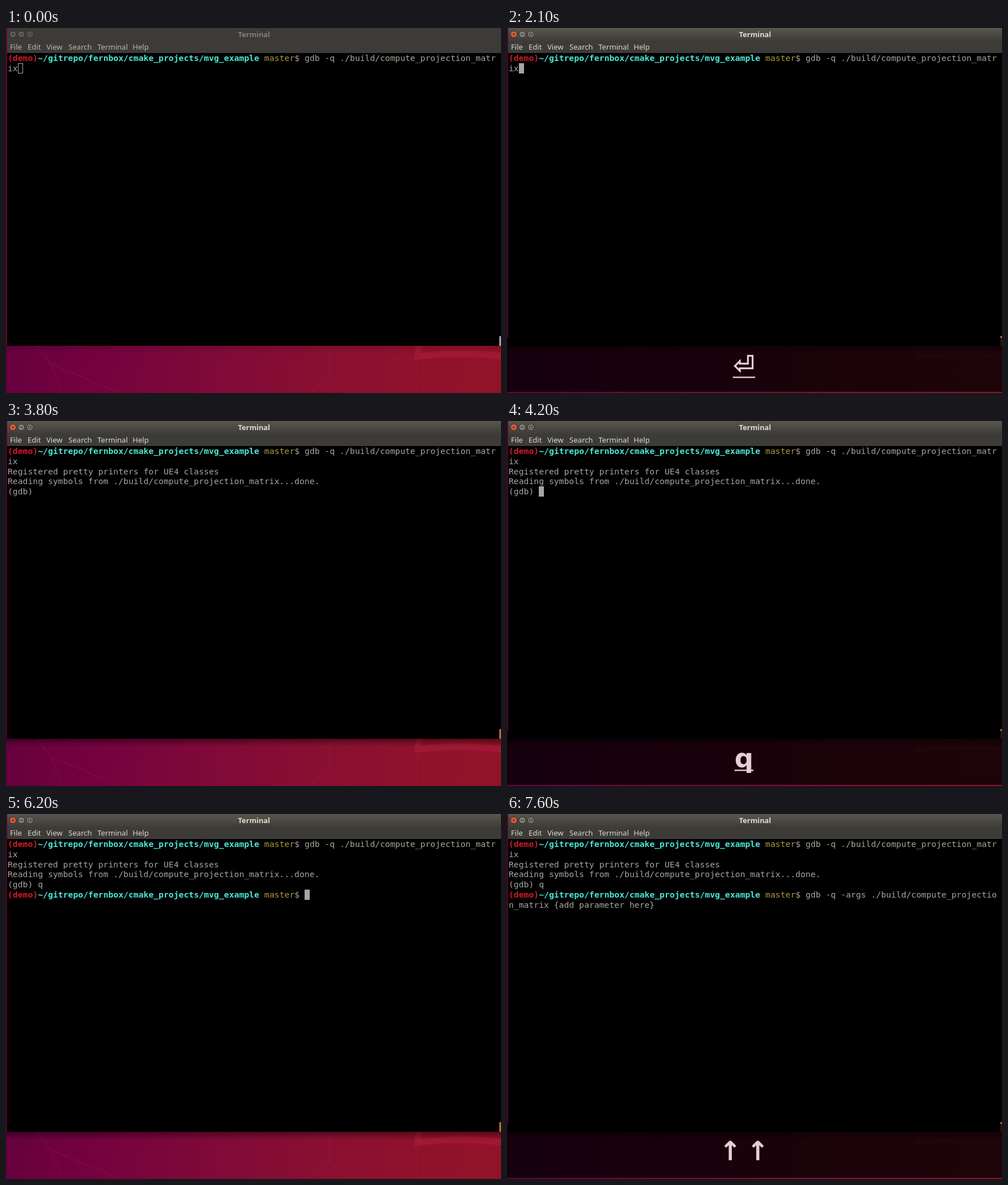
An HTML page for the animation above (8 s loop, 872 by 642 pixels).

```html
<!DOCTYPE html>
<html lang="en">
<head>
<meta charset="utf-8">
<title>Terminal</title>
<style>
  html, body { margin: 0; width: 100%; height: 100%; overflow: hidden; background: #000; }
  svg { display: block; width: 872px; height: 642px; }
  text { white-space: pre; }
  .mono { font: 14.725px "DejaVu Sans Mono", monospace; fill: #a5a5a2; }
  .who { font-weight: bold; fill: #cf1b29; }
  .path { font-weight: bold; fill: #4ae8d6; }
  .branch { fill: #b0983a; }
  .menu { font: 13.1px "Noto Sans", sans-serif; }
  .title { font: bold 12.8px "Noto Sans", sans-serif; }
  .keys { font: bold 46.7px "DejaVu Sans", sans-serif; fill: #fff; }
</style>
</head>
<body>
<svg id="stage" viewBox="0 0 872 642" xmlns="http://www.w3.org/2000/svg">
  <defs>
    <linearGradient id="wall" x2="1" y2="0.08">
      <stop offset="0" stop-color="#62003f"/>
      <stop offset=".25" stop-color="#74023f"/>
      <stop offset=".5" stop-color="#800a38"/>
      <stop offset=".75" stop-color="#8b1030"/>
      <stop offset="1" stop-color="#92122a"/>
    </linearGradient>
    <linearGradient id="bar" x2="0" y2="1">
      <stop offset="0" stop-color="#58564d"/>
      <stop offset="1" stop-color="#3c3b37"/>
    </linearGradient>
    <linearGradient id="shade" x2="0" y2="1">
      <stop offset="0" stop-color="#000" stop-opacity=".4"/>
      <stop offset="1" stop-color="#000" stop-opacity="0"/>
    </linearGradient>
  </defs>

  <g id="desktop">
    <rect width="872" height="642" fill="url(#wall)"/>
    <rect width="3" height="559" fill="#7a0038"/>
    <path d="M55 559L78 590L100 642M78 590L200 642M570 559V612L535 642M570 612L610 642M724 584V642" fill="none" stroke="#a02048" stroke-opacity=".22" stroke-width="2"/>
    <path d="M722 559H733L732 571Q800 563 872 571V583Q795 574 718 584Z" fill="#a81c3a" fill-opacity=".65"/>
    <g id="shadow">
      <rect y="559" width="872" height="14" fill="url(#shade)"/>
      <rect width="2" height="559" opacity=".3"/>
    </g>
  </g>

  <rect x="2" y="43" width="870" height="516"/>
  <rect x="2" width="870" height="44" fill="#3c3b37"/>
  <rect id="titlebar" x="2" width="870" height="24" fill="url(#bar)"/>
  <g id="buttons" stroke="#2f2e2a"></g>
  <text id="title" class="title" x="437" y="16" text-anchor="middle">Terminal</text>
  <g id="menu" class="menu"></g>
  <rect id="grip" x="869" y="542" width="3" height="17"/>

  <g id="screen" class="mono"></g>
  <rect id="cursor" stroke="#a5a5a2"/>

  <g id="overlay" opacity=".8">
    <rect y="545" width="872" height="95"/>
    <text id="keys" class="keys" x="417.5" y="609" text-anchor="middle"></text>
    <rect id="underline" y="613.2" height="2.4" fill="#fff"/>
  </g>
</svg>
<script>
const LOOP = 8000;
const CELL = { x: 3, y: 44.3, w: 8.865, h: 17.72 };
const $ = id => document.getElementById(id);

function add(parent, tag, attrs, text = "") {
  const node = document.createElementNS("http://www.w3.org/2000/svg", tag);
  for (const name in attrs) node.setAttribute(name, attrs[name]);
  node.textContent = text;
  return parent.appendChild(node);
}
const set = (node, attrs) => Object.entries(attrs).forEach(([k, v]) => node.setAttribute(k, v));
const show = (node, on) => { node.style.display = on ? "" : "none"; };

// Window furniture
const buttons = [
  [12, "M10 9l4 4m0-4l-4 4"], [27, "M24 11h6"], [42, "M39.5 9h5v4h-5z"]
].map(([cx, d]) => {
  const disc = add($("buttons"), "circle", { cx, cy: 11, r: 5.8 });
  add($("buttons"), "path", { d, fill: "none" });
  return disc;
});
[["File", 7], ["Edit", 38], ["View", 71], ["Search", 110], ["Terminal", 161], ["Help", 223]]
  .forEach(([label, x]) => add($("menu"), "text", { x, y: 38.3 }, label));

// Terminal contents: each piece of text is visible from one time to another
const pieces = [];
function put(row, col, text, from = 0, to = LOOP, style = "") {
  const attrs = { x: CELL.x + col * CELL.w, y: CELL.y + row * CELL.h + 14, class: style };
  pieces.push({ node: add($("screen"), "text", attrs, text), from, to });
}
function prompt(row, from) {
  put(row, 0, "(demo)", from, LOOP, "who");
  put(row, 6, "~/gitrepo/fernbox/cmake_projects/mvg_example", from, LOOP, "path");
  put(row, 51, "master", from, LOOP, "branch");
  put(row, 57, "$", from);
}
function command(row, text, from, to) {
  put(row, 59, text.slice(0, 38), from, to);
  put(row + 1, 0, text.slice(38), from, to);
}
const program = "./build/compute_projection_matrix";
prompt(0, 0);
command(0, "gdb -q " + program);
put(2, 0, "Registered pretty printers for UE4 classes", 2200);
put(3, 0, `Reading symbols from ${program}...done.`, 2200);
put(4, 0, "(gdb) ", 3200);
put(4, 6, "q", 4300);
prompt(5, 4700);
command(5, "gdb -q " + program, 6700, 7000);
command(5, `gdb -q -args ${program} {add parameter here}`, 7000);

// [time, column, row, visible]
const cursorSteps = [
  [0, 2, 1, 1], [1100, 2, 1, 0], [1700, 2, 1, 1],
  [2200, 0, 4, 1], [3000, 0, 4, 0], [3400, 6, 4, 1], [3800, 6, 4, 0],
  [4200, 6, 4, 1], [4300, 7, 4, 1],
  [4700, 59, 5, 1], [5200, 59, 5, 0], [5800, 59, 5, 1], [6500, 59, 5, 0],
  [6700, 2, 6, 1], [7000, 29, 6, 1], [7600, 29, 6, 0]
];
// [time, pressed keys, last key underlined]
const keySteps = [
  [0, ""], [2100, "⏎", 1], [2300, "⏎", 0], [3600, ""],
  [4200, "q", 1], [4400, "q", 0], [4700, "q\u2009⏎", 1], [5000, "q\u2009⏎", 0], [6200, ""],
  [6700, "↑", 1], [6900, "↑\u2009↑", 1], [7200, "↑\u2009↑", 0]
];
const at = (steps, t) => steps.filter(step => step[0] <= t).pop();

function drawWindow(focused) {
  const pick = (on, off) => focused ? on : off;
  set($("titlebar"), { fill: pick("url(#bar)", "#3c3b37") });
  set($("title"), { fill: pick("#dfdbd2", "#817f78") });
  set($("menu"), { fill: pick("#dbd7ce", "#bab7af") });
  set($("grip"), { fill: pick("#c7693f", "#a5a5a2") });
  set($("shadow"), { opacity: pick(1, 0.3) });
  buttons.forEach((disc, i) => set(disc, { fill: pick(i ? "#807e74" : "#df5b35", "#5f5d57") }));
}

function drawCursor(t, focused) {
  const [, col, row, on] = at(cursorSteps, t);
  const inset = focused ? 0 : 0.5;
  set($("cursor"), {
    x: Math.round(CELL.x + col * CELL.w) + inset,
    y: Math.round(CELL.y + row * CELL.h) + inset,
    width: 9 - 2 * inset,
    height: 18 - 2 * inset,
    fill: focused ? "#a5a5a2" : "none",
    "stroke-width": focused ? 0 : 1
  });
  show($("cursor"), on);
}

function drawKeys(t) {
  const [, label, underlined] = at(keySteps, t);
  show($("overlay"), label);
  show($("underline"), underlined);
  if ($("keys").textContent !== label) $("keys").textContent = label;
  if (!underlined) return;
  const last = label.length - 1;
  const x = $("keys").getStartPositionOfChar(last).x;
  set($("underline"), { x, width: $("keys").getEndPositionOfChar(last).x - x });
}

function draw(t) {
  const focused = t >= 600;
  drawWindow(focused);
  pieces.forEach(p => show(p.node, t >= p.from && t < p.to));
  drawCursor(t, focused);
  drawKeys(t);
}

const start = performance.now();
function tick() {
  draw((performance.now() - start) % LOOP);
  requestAnimationFrame(tick);
}
tick();
</script>
</body>
</html>
```
